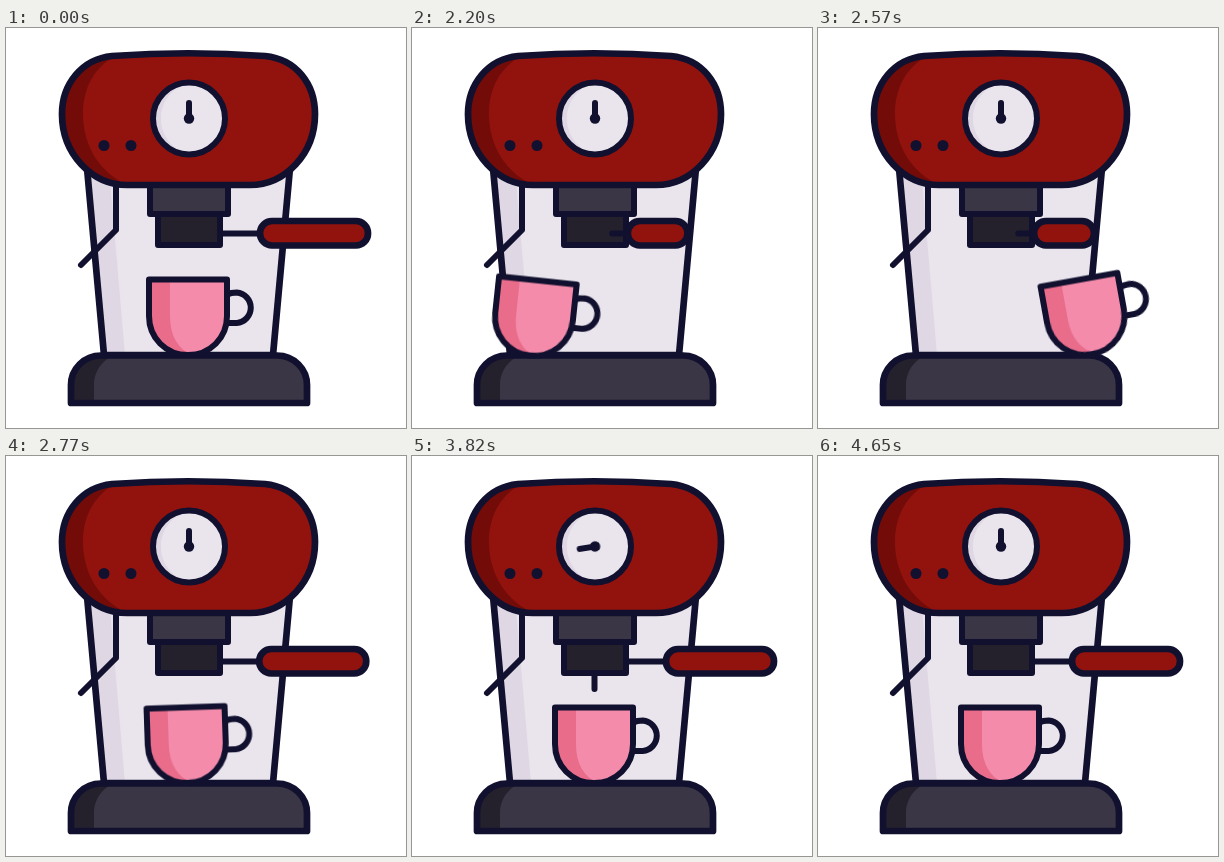
An HTML page for the animation above (4.67 s loop, 400 by 400 pixels).

```html
<!DOCTYPE html>
<html lang="en">
<head>
<meta charset="utf-8">
<title>Coffee machine</title>
<style>
  html, body { margin: 0; width: 100%; height: 100%; overflow: hidden; background: #fff; }
  svg { display: block; width: 100vw; height: 100vh; }

  .line { fill: none; stroke: #11102f; stroke-width: 6; stroke-linecap: round; stroke-linejoin: round; }
  .outer { stroke-width: 6.7; }
  .ink { fill: #11102f; }
  .steel { fill: #eae5ed; }
  .steel-dim { fill: #dfd8e4; }
  .red { fill: #92130d; }
  .red-dim { fill: #730c09; }
  .grey { fill: #3b3645; }
  .dark { fill: #25212c; }
  .pink { fill: #f48baa; }
  .pink-dim { fill: #e96c8b; }

  .grip, .rod, .cup, .tilt, .needle, .stream { animation: 4670ms linear infinite; }

  /* filter handle swings towards the viewer and back */
  .grip { animation-name: grip; }
  .rod { animation-name: rod; }
  @keyframes grip {
    0%, 42.76% { x: 254px; width: 108px; animation-timing-function: cubic-bezier(.3, .345, .75, .82); }
    51.07% { x: 187px; width: 23px; animation-timing-function: cubic-bezier(.25, .18, .7, .655); }
    59.42%, 100% { x: 254px; width: 108px; }
  }
  @keyframes rod {
    0%, 42.76% { x: 214px; width: 40px; animation-timing-function: cubic-bezier(.3, .345, .75, .82); }
    51.07% { x: 184.5px; width: 5px; animation-timing-function: cubic-bezier(.25, .18, .7, .655); }
    59.42%, 100% { x: 214px; width: 40px; }
  }

  /* cup leaves on the left, a fresh one arrives from the right */
  .cup { animation-name: cup; }
  .tilt { animation-name: tilt; transform-origin: 177px 325px; }
  @keyframes cup {
    0%, 43% { transform: translateX(0); animation-timing-function: cubic-bezier(.333, 0, .667, .333); }
    51.82% { transform: translateX(-291px); animation-timing-function: step-end; }
    51.83% { transform: translateX(285px); animation-timing-function: cubic-bezier(.333, .667, .667, 1); }
    59.3%, 100% { transform: translateX(0); }
  }
  @keyframes tilt {
    0%, 43% { transform: rotate(0deg); animation-timing-function: cubic-bezier(.333, 0, .667, .333); }
    51.82% { transform: rotate(27.5deg); animation-timing-function: step-end; }
    51.83% { transform: rotate(-18deg); animation-timing-function: cubic-bezier(.3, .39, .7, .8); }
    60.6%, 100% { transform: rotate(0deg); }
  }

  .needle { animation-name: needle; transform-origin: 183px 90.5px; }
  @keyframes needle {
    0%, 59.74% { transform: rotate(0deg); animation-timing-function: cubic-bezier(.37, 0, .63, 1); }
    77.09%, 79.23% { transform: rotate(-103deg); animation-timing-function: cubic-bezier(.37, 0, .63, 1); }
    99.57%, 100% { transform: rotate(0deg); }
  }

  .stream { stroke-dasharray: 48 200; animation-name: stream; }
  @keyframes stream {
    0%, 62.1% { stroke-dashoffset: 48px; }
    67.45%, 79.23% { stroke-dashoffset: 0px; }
    83.51%, 100% { stroke-dashoffset: 48px; }
  }
</style>
</head>
<body>
<svg viewBox="0 0 400 400">
  <!-- body -->
  <path class="steel" d="M81 140L98 327H267L284 140Z"/>
  <path class="steel-dim" d="M81 140L98 327H119L103 140Z"/>
  <path class="line outer" d="M81 140L98 327H267L284 140Z"/>
  <path class="line" d="M110 155V202L75 237"/>

  <!-- base -->
  <path class="grey" d="M65 375V357C65 341 78 327.5 95 327.5H271C288 327.5 301 341 301 357V375Z"/>
  <path class="dark" d="M65 375V357C65 341 78 327.5 95 327.5H109C97 331 88 343 88 357V375Z"/>
  <path class="line outer" d="M65 375V357C65 341 78 327.5 95 327.5H271C288 327.5 301 341 301 357V375Z"/>

  <!-- brew group -->
  <path class="line stream" d="M182.5 214V262"/>
  <rect class="line" style="fill:#25212c" x="152" y="186" width="62" height="31"/>
  <rect class="line" style="fill:#3b3645" x="144" y="157" width="78" height="29"/>

  <!-- head -->
  <path class="red" d="M106 28Q182 22.5 259 28C290 31 309 56 309 86C309 126 279 157 244 157H121C86 157 56 126 56 86C56 56 76 31 106 28Z"/>
  <path class="red-dim" d="M110 28C89 38 77 60 77 86C77 119 95 145 121 157C86 157 56 126 56 86C56 56 76 31 106 28Z"/>
  <path class="line outer" d="M106 28Q182 22.5 259 28C290 31 309 56 309 86C309 126 279 157 244 157H121C86 157 56 126 56 86C56 56 76 31 106 28Z"/>
  <circle class="ink" cx="98" cy="117.5" r="5.5"/>
  <circle class="ink" cx="125" cy="117.5" r="5.5"/>

  <!-- gauge -->
  <circle class="steel" cx="183" cy="90.5" r="36"/>
  <path class="steel-dim" d="M183 54.5A36 36 0 0 0 183 126.5C167 122 155 108 155 90.5S167 59 183 54.5Z"/>
  <circle class="line" cx="183" cy="90.5" r="36"/>
  <g class="needle">
    <path class="line" d="M183 90.5V75"/>
    <circle class="ink" cx="183" cy="90.5" r="5.2"/>
  </g>

  <!-- filter handle -->
  <rect class="ink rod" x="214" y="202.5" width="40" height="6" rx="3"/>
  <rect class="line outer grip" style="fill:#92130d" x="254" y="193" width="108" height="24.5" rx="12"/>

  <!-- cup -->
  <g class="cup"><g class="tilt">
    <path class="line" d="M221 266.5Q225 264.5 230.7 264.5A15.3 15.3 0 0 1 230.7 295H219"/>
    <path class="pink" d="M143 251.5H221V288C221 310 204 327 182 327S143 310 143 288Z"/>
    <path class="pink-dim" d="M143 251.5H164V288C164 308 172 321 186 327H182C160 327 143 310 143 288Z"/>
    <path class="line" d="M143 251.5H221V288C221 310 204 327 182 327S143 310 143 288Z"/>
  </g></g>
</svg>
</body>
</html>
```
